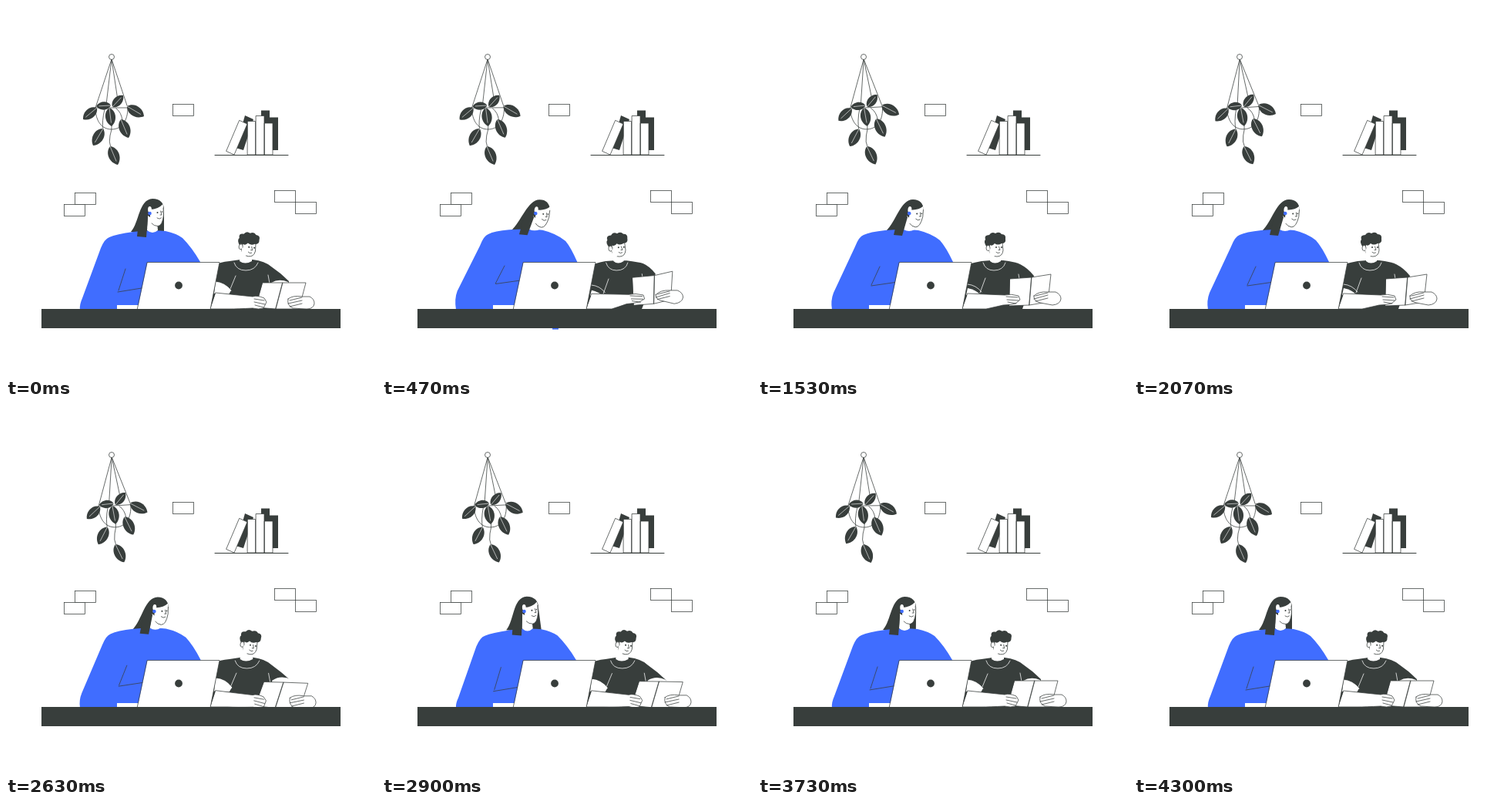
Write an HTML page that moves like this. It is 480 px wide and 480 px high and loops after 4.33 s.

```html
<!DOCTYPE html>
<html lang="en">
<head>
<meta charset="utf-8">
<title>Reading together</title>
<style>
html, body { margin: 0; width: 100%; height: 100%; overflow: hidden; background: #fff; }
svg { display: block; width: 100%; height: 100%; stroke-width: .75; }
.w { fill: #fff; stroke: #383e3c; }
.d { fill: #383e3c; }
.p { fill: #fff; }
.b { fill: #406dff; }
.l { fill: none; stroke: #383e3c; }
.v { fill: none; stroke: #fff; }
path { stroke-linejoin: round; stroke-linecap: round; }
</style>
</head>
<body>
<svg viewBox="0 0 480 480">
  <!-- wall -->
  <g id="bricks" class="w"></g>
  <path class="d" d="M310 142L321 147L308 187L298 184Z M331 135.500H342V193H331Z M341 144.500H353V187H341Z"/>
  <path class="w" d="M303 148.500L313 153L296 193L286 188.500Z M313.500 149.500H323.500V193H313.500Z M324.500 142.500H335V193H324.500Z M335.500 152H346V193H335.500Z"/>
  <path class="l" stroke-width="1" d="M271 193.500H366"/>

  <!-- hanging plant -->
  <g id="plant">
    <path class="w" d="M116 132H158C158 149 150 160 137 160S116 149 116 132Z"/>
    <path class="l" d="M137 69L116 132M137 69L130 128M137 69L145 122M137 69L158 132M128 134Q124 150 126 161M134 132Q140 155 135 168Q133 176 136 184M143 133Q150 138 151 149"/>
    <g id="leaves"></g>
  </g>
  <circle class="w" cx="137" cy="66" r="3.500"/>

  <!-- child -->
  <g data-who="child">
    <path class="d" d="M270 337Q277 332 290 331L304 329H320Q336 331 344 338Q356 346 367 357L360 393H265Z"
       data-to="M270 337Q277 333 290 331L302 330H318Q334 332 340 335Q350 340 358 350L343 393H265Z"/>
    <path class="p" d="M304 318L303 331Q310 336 319 331L319 318Z" data-to="M301 318L301 331Q307 336 315 331L314 318Z"/>
    <path class="v" d="M296 333Q299 343 311 343Q323 343 327 333" data-to="M292 333Q295 343 306 343Q318 343 321 333"/>
    <path class="v" d="M298 350L291 367M340 349L342 360" data-to="M295 353L288 372M338 348L339 354"/>
    <path class="p" d="M272 358Q284 359 292 369L289 374L270 373Z" data-to="M272 366Q282 368 288 374L287 376L270 375Z"/>
    <path class="p" d="M344 359Q354 353 366 358L366 364L344 364Z" data-to="M340 360Q346 360 352 360L352 364L340 364Z"/>
    <path class="v" d="M272 358Q284 359 292 369" data-to="M272 361Q283 362 290 371"/>
  </g>
  <g id="kidHead">
    <path class="w" d="M299 306H317L318 317Q317 325 310 325Q302 325 300 318Z"/>
    <path class="d" d="M297 313Q292 306 295 303Q293 297 300 297Q303 292 308 295Q313 292 316 296Q322 296 321 302Q322 308 316 308Q311 311 307 308Q304 312 301 310L300 316Z"/>
    <ellipse class="w" cx="298.500" cy="314" rx="2.500" ry="3.500"/>
    <path class="p" d="M300 314L307 325L301 326Z"/>
    <path class="l" d="M312.500 312L314 316.500H312M309 319.500Q311 321.500 313.500 320"/>
    <circle class="d" cx="309" cy="313" r="1"/><circle class="d" cx="316" cy="313" r="1"/>
  </g>
  <g data-who="child">
    <path class="w" d="M333 359L359 359L350 393L324 391Z M359 359L389 359L380 393L350 393Z"
       data-to="M327 354L355 352L352 388L326 389Z M355 352L380 348L376 384L352 388Z"/>
    <path class="w" d="M272 372L320 377Q326 375 335 379L338 384L334 392Q328 394 320 392Q300 393 290 393L265 393Z"
       data-to="M272 373L320 375Q328 373 338 376L340 381L334 386Q326 388 318 388Q305 391 296 393L265 393Z"/>
    <path class="l" d="M322 380L335 382M322 384L336 387M323 388L334 391" data-to="M322 377L337 378M323 381L338 382M324 384L335 386"/>
    <path class="w" d="M366 380Q372 375 384 377L394 377Q400 380 400 386Q399 393 390 393L372 392Q364 388 366 380Z"
       data-to="M358 376Q364 370 376 371L386 371Q393 374 393 380Q392 387 382 388L366 385Q357 383 358 376Z"/>
    <path class="l" d="M384 378L368 382M384 382L366 386M384 386L368 390" data-to="M376 372L360 376M376 375L358 380M376 379L360 383"/>
  </g>

  <!-- mother -->
  <g data-who="mum">
    <path class="d" d="M190 250C200 250 205 256 205 264L205 293L190 296L162 293C173 281 172 251 190 250Z"
       data-to="M201 251C210 251 214 256 215 264L196 286L190 295L166 292C179 280 185 251 201 251Z"/>
    <path class="b" d="M96 394Q95 388 99 379L123 314Q128 302 134 300Q143 296 165 293Q190 290 207 292Q221 295 229 301Q241 313 252 332L260 394Z"
       data-to="M96 394Q94 382 98 372L126 312Q131 299 137 297Q145 293 165 291Q190 289 208 291Q225 295 236 304Q244 313 253 332L260 394Z"/>
    <path class="b" d="M221 400L221 412L229 412L229 400Z" data-to="M221 400L221 417.800L229 417.800L229 400Z"/>
    <path class="l" d="M155 341L146 369M145 371L176 366" data-to="M158 338L147 362M147 363L178 358.500"/>
    <path class="p" d="M184 272L183 291Q190 297 197 291L196 280Z" data-to="M193 272L189 290Q196 294 203 290L204 282Z"/>
  </g>
  <g class="mumHead">
    <path class="p" d="M187 264Q197 264 203.500 257Q205 263 204.500 271Q203 285 197 285.500Q189 286 187 278Z"/>
    <path class="l" d="M204 262L204.500 271Q203 285 197 285.500Q192 285.500 189 282M200.500 266L202 271H200M196 275Q199 277.500 201.500 275"/>
    <circle class="d" cx="196.500" cy="268" r="1"/><circle class="d" cx="202.500" cy="267" r=".8"/>
  </g>
  <g data-who="mum">
    <path class="d" d="M180 262L184 274L182 300L170 299L172 280Z" data-to="M187 262L194 274L187 298L176 297L180 280Z"/>
  </g>
  <g class="mumHead">
    <ellipse class="p" cx="186.500" cy="264" rx="2.400" ry="4"/>
    <circle class="b" cx="186.500" cy="269" r="2.300"/>
  </g>

  <!-- desk -->
  <path class="p" d="M144 388H172V394H144Z"/>
  <path class="w" d="M183.500 332.500H277L265 394H170.500Z"/>
  <circle class="d" cx="224" cy="362.500" r="4.900"/>
  <path class="d" d="M46 393H434V418H46Z"/>
</svg>
<script>
const LOOP = 4330;
const $ = id => document.getElementById(id);

$('bricks').innerHTML = [[216.5, 127.5], [89.5, 242.5], [75.5, 257.5], [348.5, 239.5], [375.5, 254.5]]
  .map(([x, y]) => `<rect x="${x}" y="${y}" width="27" height="15"/>`).join('');

// A leaf runs from its stem to its tip, with a pale vein.
function leaf([x1, y1, x2, y2]) {
  const dx = x2 - x1, dy = y2 - y1, k = 0.36;
  const at = (f, s) => `${x1 + dx * f - s * dy * k} ${y1 + dy * f + s * dx * k}`;
  return `<path class="d" d="M${x1} ${y1}C${at(0.2, 1)} ${at(0.75, 1)} ${x2} ${y2}C${at(0.75, -1)} ${at(0.2, -1)} ${x1} ${y1}Z"/>
    <path class="v" stroke-width=".6" d="M${x1} ${y1}L${x1 + dx * 0.8} ${y1 + dy * 0.8}"/>`;
}
$('leaves').innerHTML = [
  [118, 132, 100, 147], [136, 129, 117, 130], [138, 131, 152, 116], [157, 130, 179, 143],
  [134, 132, 137, 156], [149, 147, 159, 171], [126, 159, 113, 181], [135, 182, 145, 206]
].map(leaf).join('');

const shapes = [...document.querySelectorAll('[data-to]')].map(el => ({
  el,
  from: el.getAttribute('d'),
  to: el.dataset.to.match(/[\d.]+/g),
  who: el.parentNode.dataset.who
}));
const mumHead = document.querySelectorAll('.mumHead');

// Lean over time: 0 is the rest pose, 1 the reading pose, with overshoot.
const moves = {
  mum: [[30, 0], [440, 1.32], [1000, 0.98], [1500, 1], [2430, 1], [2960, -0.25], [3500, 0.02], [4200, 0]],
  child: [[30, 0], [450, 1.35], [1000, 1], [2180, 1], [2610, -0.3], [3180, 0]]
};

function ease(keys, t) {
  const i = keys.findIndex(k => k[0] > t);
  if (i <= 0) return 0;
  const [t0, a] = keys[i - 1], [t1, b] = keys[i];
  return a + (b - a) * (1 - Math.cos(Math.PI * (t - t0) / (t1 - t0))) / 2;
}

function draw(now) {
  const t = now % LOOP;
  const lean = { mum: ease(moves.mum, t), child: ease(moves.child, t) };
  for (const { el, from, to, who } of shapes) {
    let i = 0;
    el.setAttribute('d', from.replace(/[\d.]+/g, n => +n + (to[i++] - n) * lean[who]));
  }
  const m = lean.mum, c = 1 - lean.child;
  mumHead.forEach(g => g.setAttribute('transform', `translate(${9.5 * m} ${0.5 * m}) rotate(${8 * m} 190 270)`));
  $('kidHead').setAttribute('transform', `translate(${4.5 * c} ${-0.5 * c}) rotate(${8 * c} 308 325)`);
  const sway = (1 - Math.cos(2 * Math.PI * t / LOOP)) / 2;
  $('plant').setAttribute('transform', `rotate(${-3.8 * sway} 137 66)`);
  requestAnimationFrame(draw);
}
requestAnimationFrame(draw);
</script>
</body>
</html>
```
